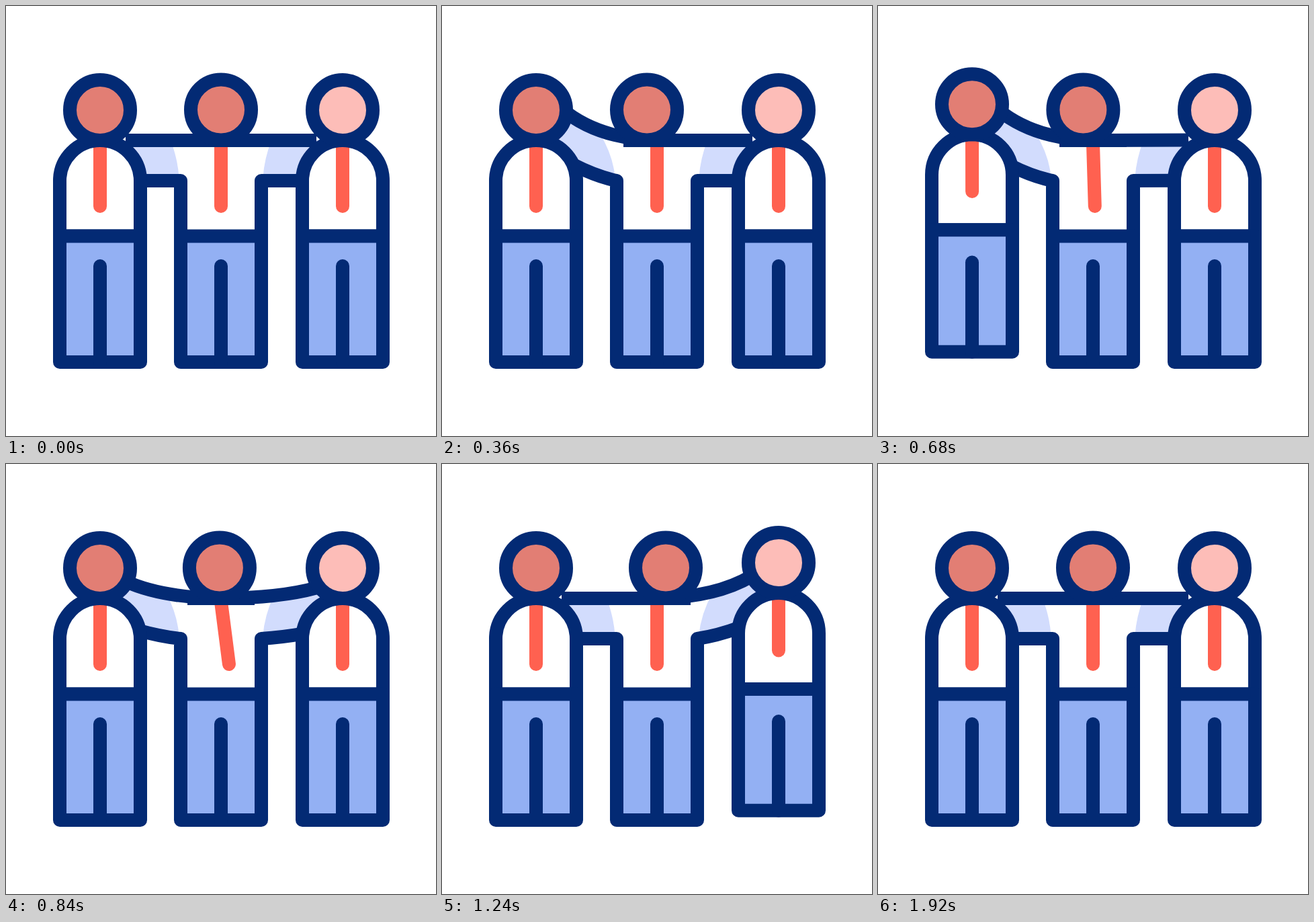
Recreate the animation shown at these times as an HTML page. Size 640 by 640 pixels, loop 2000 ms.

```html
<!DOCTYPE html>
<html lang="en">
<head>
<meta charset="utf-8">
<title>Three friends</title>
<style>
  html, body { margin: 0; width: 100%; height: 100%; overflow: hidden; background: #fff; }
  svg { display: block; width: 100vw; height: 100vh; }
  .line { stroke: #032a74; stroke-width: 20; stroke-linejoin: round; }
  .tie { stroke: #ff6150; stroke-width: 20; stroke-linecap: round; }
</style>
</head>
<body>
<svg id="stage" viewBox="0 0 640 640" fill="none"></svg>
<script>
const LOOP = 2000, STEP = 40;
const WHITE = '#fff', SLEEVE = '#d2dcfd', DENIM = '#93b0f3';
const DARK = '#e27e74', LIGHT = '#fdbdb8';
const stage = document.getElementById('stage');

const clamp = v => Math.min(1, Math.max(0, v));
const ramp = (t, a, b) => clamp((t - a) / (b - a));
const ease = (t, a, b) => (1 - Math.cos(Math.PI * ramp(t, a, b))) / 2;
const swing = (t, a, b) => Math.sin(Math.PI * ramp(t, a, b));

function add(parent, tag, attrs = {}) {
  const el = document.createElementNS('http://www.w3.org/2000/svg', tag);
  for (const key in attrs) el.setAttribute(key, attrs[key]);
  return parent.appendChild(el);
}
const path = (parent, cls, fill = 'none') => add(parent, 'path', { class: cls, fill });
const draw = (el, d) => el.setAttribute('d', d);

function makeLegs(parent) {
  const box = path(parent, 'line', DENIM);
  const seam = path(parent, 'line');
  seam.setAttribute('stroke-linecap', 'round');
  return (x, waist, crotch, foot) => {
    draw(box, `M${x - 60} ${waist}H${x + 60}V${foot}H${x - 60}Z`);
    draw(seam, `M${x} ${crotch}V${foot}`);
  };
}

function makeHead(parent, fill) {
  const head = add(parent, 'circle', { class: 'line', r: 45, fill });
  return (x, y) => {
    head.setAttribute('cx', x);
    head.setAttribute('cy', y);
  };
}

// One side of the middle figure's arms, drawn for the left and mirrored for the right.
function makeArm(parent, mirrored) {
  const g = add(parent, 'g', mirrored ? { transform: 'matrix(-1 0 0 1 640 0)' } : {});
  const sleeve = path(g, '', SLEEVE);
  const shirt = path(g, '', WHITE);
  const edge = path(g, 'line');
  return lift => {
    const top = `M178 ${200 - 47 * lift}Q232 ${200 - 2 * lift} 320 200`;
    const low = 260 - 24 * lift, bend = 260 - 6 * lift;
    draw(sleeve, `${top}V260H260Q230 ${bend} 195 ${low}L165 200Z`);
    draw(shirt, `M${245 - 11 * lift} ${200 - 12 * lift}Q256 ${228 - 4 * lift} 258 260L260 343H321V200Z`);
    draw(edge, `${top}M195 ${low}Q230 ${bend} 260 260V343`);
  };
}

function makeMiddle() {
  const g = add(stage, 'g');
  const arms = [makeArm(g, false), makeArm(g, true)];
  const tie = path(g, 'tie');
  const cover = path(g, 'line');
  const legs = makeLegs(g);
  const head = makeHead(g, DARK);
  draw(cover, 'M270 200H370');
  legs(320, 342.5, 387, 530);
  return t => {
    const cross = ease(t, 650, 1050);
    const left = ease(t, 40, 360) - cross;
    const right = cross - ease(t, 1520, 1880);
    const sway = 12 * swing(t, 650, 1050) - 7 * swing(t, 40, 360) - 7 * swing(t, 1520, 1880);
    arms[0](left);
    arms[1](0.72 * right);
    draw(tie, `M320 205L${320 + sway} 298`);
    head(320 - 15 * left + 13 * right, 154.5);
  };
}

function makeSide(x, skin, start, dir) {
  const g = add(stage, 'g');
  const body = path(g, '', WHITE);
  const tie = path(g, 'tie');
  const outline = path(g, 'line');
  const legs = makeLegs(g);
  const head = makeHead(g, skin);
  return t => {
    // p climbs to 1 at the top of the hop; each part has its own delay and height
    const p = 1 - clamp(Math.abs(t - start - 160) / 160);
    const up = 16 * ease(p, 0, 1);
    const waist = 342.5 - 24 * ease(p, 0.3, 0.83);
    const torso = `M${x - 60} ${waist}V${260 - up}a60 60 0 0 1 120 0V${waist}Z`;
    draw(body, torso);
    draw(outline, torso);
    draw(tie, `M${x} ${203 - up}L${x + dir * 10 * ease(p, 0.5, 0.85)} ${298 - 41 * ease(p, 0, 1)}`);
    legs(x, waist, 387 - 24 * ease(p, 0.37, 0.86), 530 - 28.5 * ease(p, 0, 1));
    head(x, 155 - up);
  };
}

const figures = [
  makeMiddle(),
  makeSide(140, DARK, 444, 1),
  makeSide(501, LIGHT, 1160, -1)
];

const origin = performance.now();
function frame(now) {
  const time = Math.max(0, now - origin) % LOOP;
  const t = Math.floor(time / STEP) * STEP;
  figures.forEach(pose => pose(t));
  requestAnimationFrame(frame);
}
frame(origin);
</script>
</body>
</html>
```
